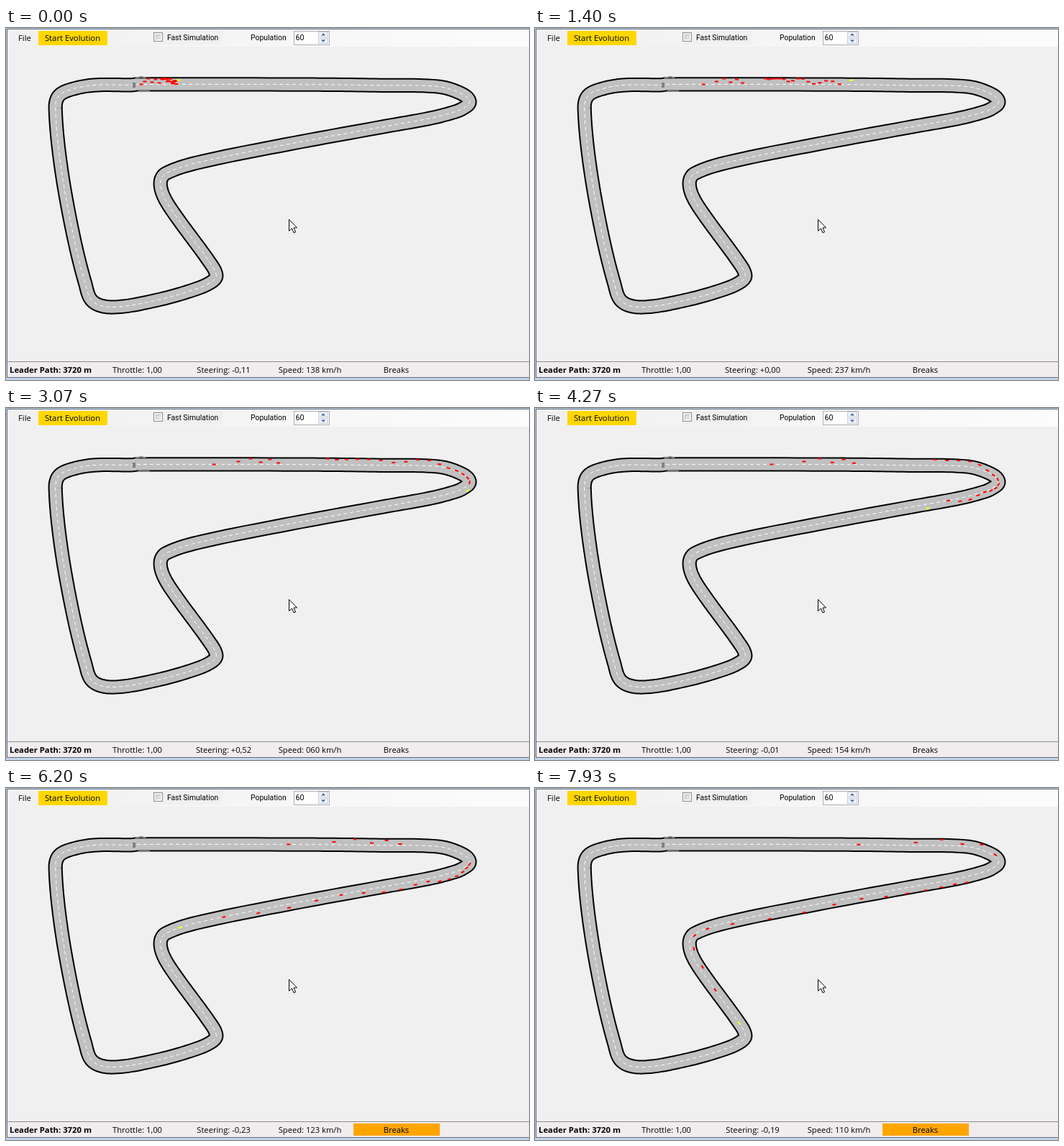
An HTML page with a canvas that plays this animation: 727 by 490 pixels, repeating every 8 s.

```html
<!DOCTYPE html>
<html lang="en">
<head>
<meta charset="utf-8">
<title>Race evolution</title>
<style>
html, body { margin: 0; width: 100%; height: 100%; overflow: hidden; background: #f0f0f0; }
canvas { display: block; }
</style>
</head>
<body>
<canvas id="stage" width="727" height="490"></canvas>
<script>
const ctx = document.getElementById('stage').getContext('2d');
const LOOP = 8000, STEP = 200 / 3;
const PX_PER_KM = 0.76;
const UI = '"Open Sans", "Noto Sans", sans-serif';
const SMALL = 'Roboto, "Liberation Sans", sans-serif';

const clamp = (v, lo, hi) => Math.min(hi, Math.max(lo, v));

// Key points of the centre line in driving direction
const knots = [
  [182, 78.5], [427, 78.7], [520, 79.8], [600, 81.5], [630, 90], [644.3, 102], [635, 112],
  [618, 118.5], [588, 126], [524, 137.5], [388, 162.5], [266, 187.5], [222, 202.5], [214.8, 214],
  [219, 234], [236, 261.5], [283, 326], [292.3, 344], [287, 352.5], [265, 363], [211, 378.5],
  [150, 388.5], [121, 381], [110, 355], [92, 281], [76, 190], [68.7, 112], [73, 95], [89, 86],
  [122, 79.6], [175, 79.3]];

// Closed smooth curve: tangents follow the neighbours, handles follow the segment length
function smooth(points, parts) {
  const at = i => points[(i + points.length) % points.length];
  const handle = (i, len) => {
    const [ax, ay] = at(i - 1), [bx, by] = at(i + 1), k = len / 3 / Math.hypot(bx - ax, by - ay);
    return [(bx - ax) * k, (by - ay) * k];
  };
  return points.flatMap((a, i) => {
    const b = at(i + 1), len = Math.hypot(b[0] - a[0], b[1] - a[1]);
    const ha = handle(i, len), hb = handle(i + 1, len);
    return Array.from({ length: parts }, (_, n) => {
      const u = n / parts, v = 1 - u;
      return [0, 1].map(c => v * v * v * a[c] + 3 * v * v * u * (a[c] + ha[c]) +
        3 * v * u * u * (b[c] - hb[c]) + u * u * u * b[c]);
    });
  });
}

const road = smooth(knots, 12);
const dist = [182];
for (let i = 1; i < road.length; i++)
  dist.push(dist[i - 1] + Math.hypot(road[i][0] - road[i - 1][0], road[i][1] - road[i - 1][1]));

// [ms, km/h] and [ms, wheel position] of the leader
const speedKeys = [[0, 138], [1400, 237], [1850, 270], [2600, 110], [2950, 52], [3070, 60],
  [4270, 154], [5070, 216], [5850, 270], [6200, 123], [6420, 85], [7480, 172], [8000, 101]];
const steerKeys = [[0, -.11], [600, 0], [2200, 0], [3070, .52], [4200, -.01], [5070, 0],
  [5900, 0], [6200, -.23], [6600, -.45], [7300, 0], [8000, -.21]];

function segment(keys, t) {
  let i = 0;
  while (i < keys.length - 2 && t >= keys[i + 1][0]) i++;
  return [keys[i], keys[i + 1]];
}

function valueAt(keys, t) {
  const [[t0, a], [t1, b]] = segment(keys, t);
  return a + (b - a) * (t - t0) / (t1 - t0);
}

function isBraking(t) {
  const [a, b] = segment(speedKeys, t);
  return b[1] < a[1];
}

// Area under the speed curve
function leaderDist(t) {
  let area = 0;
  for (let i = 1; i < speedKeys.length && speedKeys[i - 1][0] < t; i++) {
    const from = speedKeys[i - 1][0], to = Math.min(t, speedKeys[i][0]);
    area += (valueAt(speedKeys, from) + valueAt(speedKeys, to)) / 2 * (to - from) / 1000;
  }
  return 240 + area * PX_PER_KM;
}

function place(d, lane) {
  let i = 0;
  while (i < dist.length - 2 && d >= dist[i + 1]) i++;
  const [ax, ay] = road[i], [bx, by] = road[i + 1], len = dist[i + 1] - dist[i];
  const dx = (bx - ax) / len, dy = (by - ay) / len, k = d - dist[i];
  return [ax + dx * k + dy * lane, ay + dy * k - dx * lane, Math.atan2(dy, dx)];
}

function box(x, y, w, h, fill) {
  ctx.fillStyle = fill;
  ctx.fillRect(x, y, w, h);
}

function text(str, x, y, font, align = 'left') {
  ctx.font = font;
  ctx.textAlign = align;
  ctx.fillStyle = '#000';
  ctx.fillText(str, x, y);
}

function trace(points, close) {
  ctx.beginPath();
  points.forEach(([x, y]) => ctx.lineTo(x, y));
  if (close) ctx.closePath();
}

function line(points, color, width, close) {
  trace(points, close);
  ctx.strokeStyle = color;
  ctx.lineWidth = width;
  ctx.stroke();
}

function drawTrack() {
  ctx.lineJoin = 'round';
  line(road, '#000', 20.2, true);
  line(road, '#c0c0c0', 16.2, true);
  ctx.setLineDash([5, 4]);
  line(road, '#fff', 1, true);
  ctx.setLineDash([]);
  line([[178, 76], [178, 83]], '#808080', 4);
  line([[180, 70], [188, 68], [194, 69.5]], '#808080', 2);
  line([[184, 87.5], [200, 88]], '#808080', 2);
}

function drawCar(d, lane, color) {
  const [x, y, angle] = place(d, lane);
  ctx.save();
  ctx.translate(x, y);
  ctx.rotate(angle);
  box(-2.5, -1, 5, 2, color);
  ctx.restore();
}

function drawCars(t) {
  // Crawlers keep a steady speed
  for (let i = 0; i < 6; i++)
    drawCar(188 + 5 * i + (33 + 21 * Math.sqrt(i / 5)) * t / 1000, i * 4 % 9, '#f00');

  // The pack drives like the leader at a slower pace, keeping to the middle in the hairpin
  for (let i = 0; i < 16; i++) {
    const pace = 0.47 + 0.022 * i + 0.0006 * i * i;
    const gap = (24 - 1.4 * i) * Math.max(0, 1 - t / 1400);
    const d = leaderDist(t * pace) - gap;
    const lane = clamp(10.5 - 0.6 * i + 3 * Math.sin(i * 5), -4, 8);
    drawCar(d, lane * (1 - Math.exp(-(((d - 645) / 25) ** 2))), '#f00');
  }
  drawCar(leaderDist(t), 6 * clamp((6000 - t) / 600, 0, 1), '#ff0');
}

function drawToolbar() {
  const shade = ctx.createLinearGradient(0, 0, 727, 0);
  shade.addColorStop(0, '#f0f0f0');
  shade.addColorStop(1, '#fcfcfc');
  box(0, 0, 727, 26, shade);
  box(45, 4, 96, 20, '#ffd700');
  text('File', 17, 18, '11.3px ' + UI);
  text('Start Evolution', 92.5, 18, '11.3px ' + UI, 'center');

  box(204, 4, 97, 19, '#f0f0f0');
  box(205, 6, 13, 13, '#8e8f8f');
  box(206, 7, 11, 11, '#f4f4f4');
  box(208, 9, 7, 7, '#b8bcc2');
  box(209, 10, 6, 6, '#dcdfe3');
  text('Fast Simulation', 224, 17, '10.3px ' + SMALL);
  text('Population', 340, 17, '10.4px ' + SMALL);

  box(400, 4, 50, 20, '#abadb3');
  box(401, 5, 48, 18, '#fff');
  text('60', 402.5, 17, '10.6px ' + SMALL);
  for (const [y, dir] of [[5, -1], [14, 1]]) {
    box(434, y, 14, 8, '#c5cbd8');
    box(435, y + 1, 12, 6, '#eef2f8');
    const m = y + 4;
    trace([[438, m - dir * 1.5], [444, m - dir * 1.5], [441, m + dir * 1.8]], true);
    ctx.fillStyle = '#4a66a8';
    ctx.fill();
  }
}

function drawStatus(t) {
  box(0, 464, 727, 22, '#f1edee');
  box(0, 464, 727, 1, '#8c8c8c');
  box(0, 486, 727, 1, '#5f6b7c');
  box(0, 487, 727, 3, '#c3d5e8');
  if (isBraking(t)) box(483, 467, 120, 17, '#ffa500');

  const steer = valueAt(steerKeys, t);
  const sign = Math.round(steer * 100) < 0 ? '-' : '+';
  const speed = String(Math.round(valueAt(speedKeys, t))).padStart(3, '0');
  const cells = [
    'Throttle: 1,00',
    'Steering: ' + sign + Math.abs(steer).toFixed(2).replace('.', ','),
    'Speed: ' + speed + ' km/h',
    'Breaks'];
  text('Leader Path: 3720 m', 5, 480, 'bold 11.3px ' + UI);
  cells.forEach((cell, i) => text(cell, 182.5 + 120 * i, 480, '11.2px ' + UI, 'center'));
}

function drawCursor() {
  const shape = [[0, 0], [0, 16], [4, 12.5], [6.5, 18.5], [9, 17.5], [6.5, 11.5], [11, 11.5]];
  trace(shape.map(([x, y]) => [x + 393.5, y + 266.5]), true);
  ctx.fillStyle = '#fff';
  ctx.fill();
  ctx.strokeStyle = '#000';
  ctx.lineWidth = 1;
  ctx.stroke();
}

function draw(t) {
  box(0, 0, 727, 490, '#f0f0f0');
  drawToolbar();
  drawTrack();
  drawCars(t);
  drawStatus(t);
  drawCursor();
  box(0, 0, 1, 490, '#c3d0df');
  box(1, 1, 1, 486, '#5f6b7c');
  box(0, 0, 727, 1, '#c3d0df');
  box(1, 1, 726, 1, '#5f6b7c');
}

const start = performance.now();
function tick() {
  const t = (performance.now() - start) % LOOP;
  draw(Math.min(119, Math.floor((t + 5) / STEP)) * STEP);
  requestAnimationFrame(tick);
}
tick();
</script>
</body>
</html>
```
